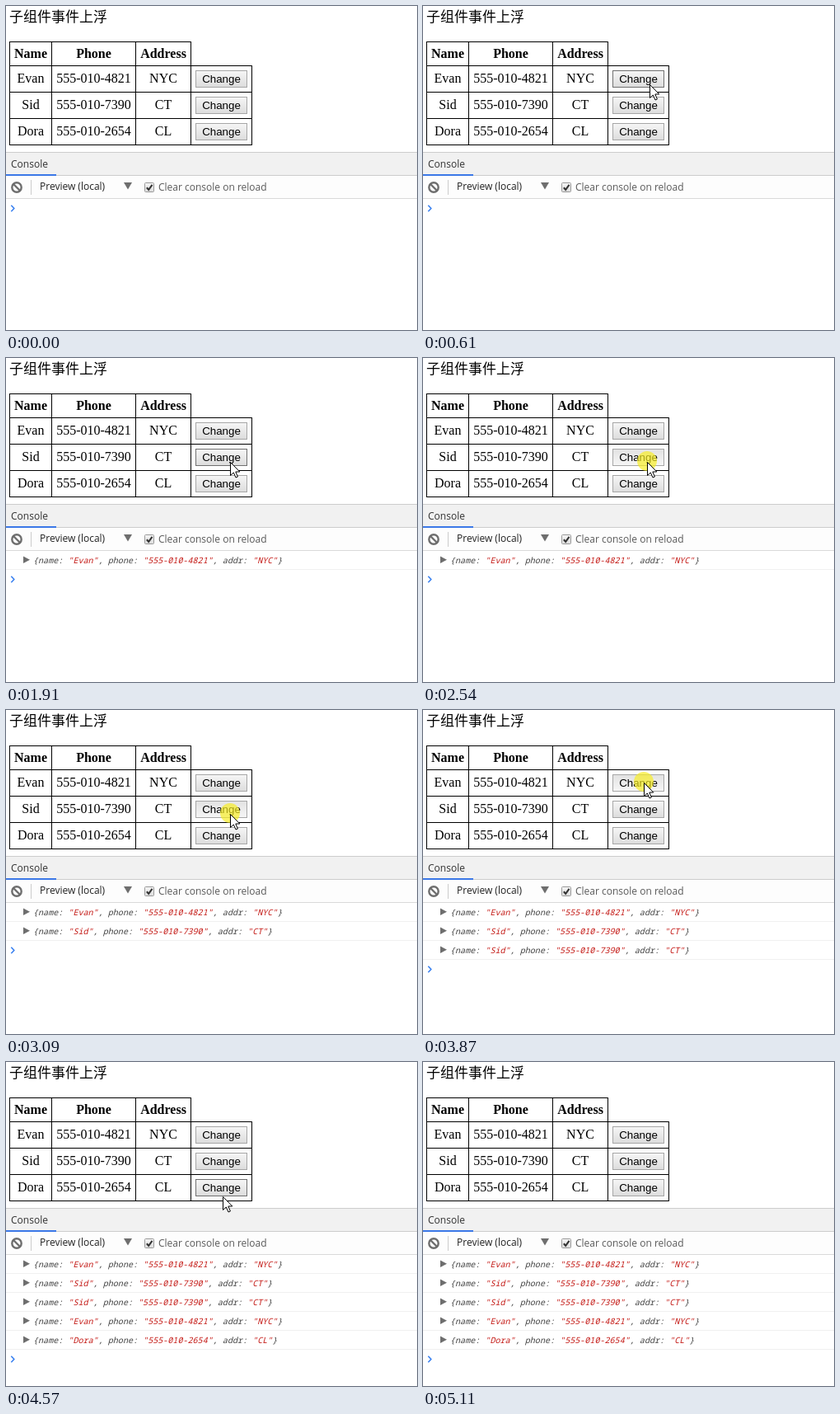
Write an HTML page that moves like this. It is 499 px wide and 393 px high and loops after 5490 ms.

```html
<!DOCTYPE html>
<html lang="zh">
<head>
<meta charset="utf-8">
<style>
html, body { margin: 0; width: 100%; height: 100%; overflow: hidden; background: #fff; }
svg { display: block; }
.title { font: 500 17px "Noto Sans CJK SC", "Noto Sans CJK", sans-serif; }
.cell { font: 16px "Liberation Serif", serif; text-anchor: middle; }
.head { font-weight: bold; }
.btn text { font: 13.33px "Liberation Sans", sans-serif; text-anchor: middle; }
.btn rect { fill: url(#up); stroke: #a6a6a6; }
.btn.hover rect { stroke: #707070; }
.btn.down rect { fill: url(#down); stroke: #a6a6a6; }
.ui { font: 12px "Open Sans", sans-serif; fill: #333; }
.log { font: italic 10.08px "Noto Sans Mono", monospace; fill: #444; }
.log tspan { fill: #c41a16; }
#glow { fill: #f8ee20; opacity: .68; }
</style>
</head>
<body>
<svg id="stage" width="499" height="393" viewBox="0 0 499 393">
  <defs>
    <linearGradient id="up" x2="0" y2="1"><stop stop-color="#f6f6f6"/><stop offset="1" stop-color="#dcdcdc"/></linearGradient>
    <linearGradient id="down" x2="0" y2="1"><stop stop-color="#e2e2e2"/><stop offset="1" stop-color="#f6f6f6"/></linearGradient>
  </defs>
  <text class="title" x="4" y="19">子组件事件上浮</text>
  <path d="M4 43.5H225M4 72.5H299M4 104.5H299M4 136.5H299M4 168.5H299M4.5 43V169M55.5 43V169M157.5 43V169M224.5 43V169M298.5 72V169" stroke="#000"/>
  <g id="table"></g>

  <path d="M0 178H499V205H0Z" fill="#f1f1f1"/>
  <path d="M0 206H499V233H0Z" fill="#fdfdfd"/>
  <path d="M0 177.5H499M0 205.5H499M30.5 211V229" stroke="#ccc"/>
  <path d="M0 233.5H499" stroke="#dadada"/>
  <path d="M0 205H61" stroke="#3b78e7" stroke-width="2"/>
  <text class="ui" x="6" y="196">Console</text>
  <g fill="none" stroke="#6e6e6e" stroke-width="2.4"><circle cx="13" cy="220" r="5.7"/><path d="M9 216L17 224"/></g>
  <text class="ui" x="41" y="223" style="fill:#222">Preview (local)</text>
  <path d="M143 214H153L148 222.5Z" fill="#6e6e6e"/>
  <rect x="168.5" y="214.5" width="11" height="11" rx="1" fill="url(#up)" stroke="#999"/>
  <path d="M170.8 220.2L173.2 222.8L177.5 216.8" fill="none" stroke="#333" stroke-width="2"/>
  <text class="ui" x="185" y="224" style="fill:#5a5a5a">Clear console on reload</text>

  <g id="logs"></g>
  <path id="prompt" d="M6.3 241.8L9.8 245.5L6.3 249.2" fill="none" stroke="#3b82f0" stroke-width="1.6"/>
  <circle id="glow" r="12"/>
  <path id="cursor" d="M.5 1.5V17.5L4.3 14L7 20L9.4 19L6.8 13H11.8Z" fill="#fff" stroke="#000"/>
</svg>
<script>
const LOOP = 5490;
const people = [
  ["Evan", "555-010-4821", "NYC"],
  ["Sid", "555-010-7390", "CT"],
  ["Dora", "555-010-2654", "CL"]
];
// press time, release time, row
const clicks = [[1370, 1450, 0], [2540, 2620, 1], [3090, 3160, 1], [3870, 3940, 0], [4410, 4570, 2]];
const start = [471, 468];
// first step, last step, step count, destination x and y, easing
const smooth = u => u * u * (3 - 2 * u);
const moves = [
  [70, 760, 10, 273, 90, u => 1 - (1 - u) ** 2.8],
  [1760, 1910, 3, 272, 125, smooth],
  [3470, 3620, 3, 268, 87, smooth],
  [4020, 4330, 5, 263, 162, smooth],
  [4810, 5110, 5, 464, 466, u => u ** 1.5]
];

const $ = id => document.getElementById(id);
const cols = [30, 106.5, 191];
const cell = (text, i, y, cls = "") => `<text class="cell ${cls}" x="${cols[i]}" y="${y}">${text}</text>`;
const button = y => `<g class="btn"><rect x="230.5" y="${y + .5}" width="62" height="20"/><text x="261.5" y="${y + 15}">Change</text></g>`;

$("table").innerHTML = ["Name", "Phone", "Address"].map((h, i) => cell(h, i, 63, "head")).join("") +
  people.map((p, r) => p.map((s, i) => cell(s, i, 93 + 32 * r)).join("") + button(78 + 32 * r)).join("");

const quote = s => `<tspan>"${s}"</tspan>`;
$("logs").innerHTML = clicks.map(([, , row], i) => {
  const [name, phone, addr] = people[row].map(quote);
  return `<g transform="translate(0 ${23 * i})">
    <path d="M21 240.5L29 244.7L21 249Z" fill="#6e6e6e"/>
    <text class="log" x="33" y="249">{name: ${name}, phone: ${phone}, addr: ${addr}}</text>
    <path d="M0 256.5H499" stroke="#f0f0f0"/></g>`;
}).join("");

const buttons = [...document.querySelectorAll(".btn")];
const logs = [...$("logs").children];

function pointer(t) {
  let [x, y] = start;
  for (const [t0, t1, n, tx, ty, ease] of moves) {
    if (t < t0) break;
    const step = Math.floor((t - t0 + 4) / (t1 - t0) * (n - 1));
    const k = ease(Math.min(1, (step + 1) / n));
    x += (tx - x) * k;
    y += (ty - y) * k;
  }
  return [Math.round(x), Math.round(y)];
}

function draw(now) {
  const t = now % LOOP;
  const [x, y] = pointer(t);
  const press = clicks.find(([a, b]) => t >= a && t < b);
  const count = clicks.filter(c => t >= c[1]).length;
  const place = `translate(${x} ${y})`;
  $("cursor").setAttribute("transform", place);
  $("glow").setAttribute("transform", place);
  $("glow").style.display = press ? "" : "none";
  buttons.forEach((b, r) => {
    const top = 78 + 32 * r;
    b.classList.toggle("hover", x >= 230 && x < 293 && y >= top && y < top + 21);
    b.classList.toggle("down", !!press && press[2] === r);
  });
  logs.forEach((l, i) => l.style.display = i < count ? "" : "none");
  $("prompt").setAttribute("transform", `translate(0 ${23 * count})`);
}

const begin = performance.now();
function tick() {
  draw(performance.now() - begin);
  requestAnimationFrame(tick);
}
tick();
</script>
</body>
</html>
```
